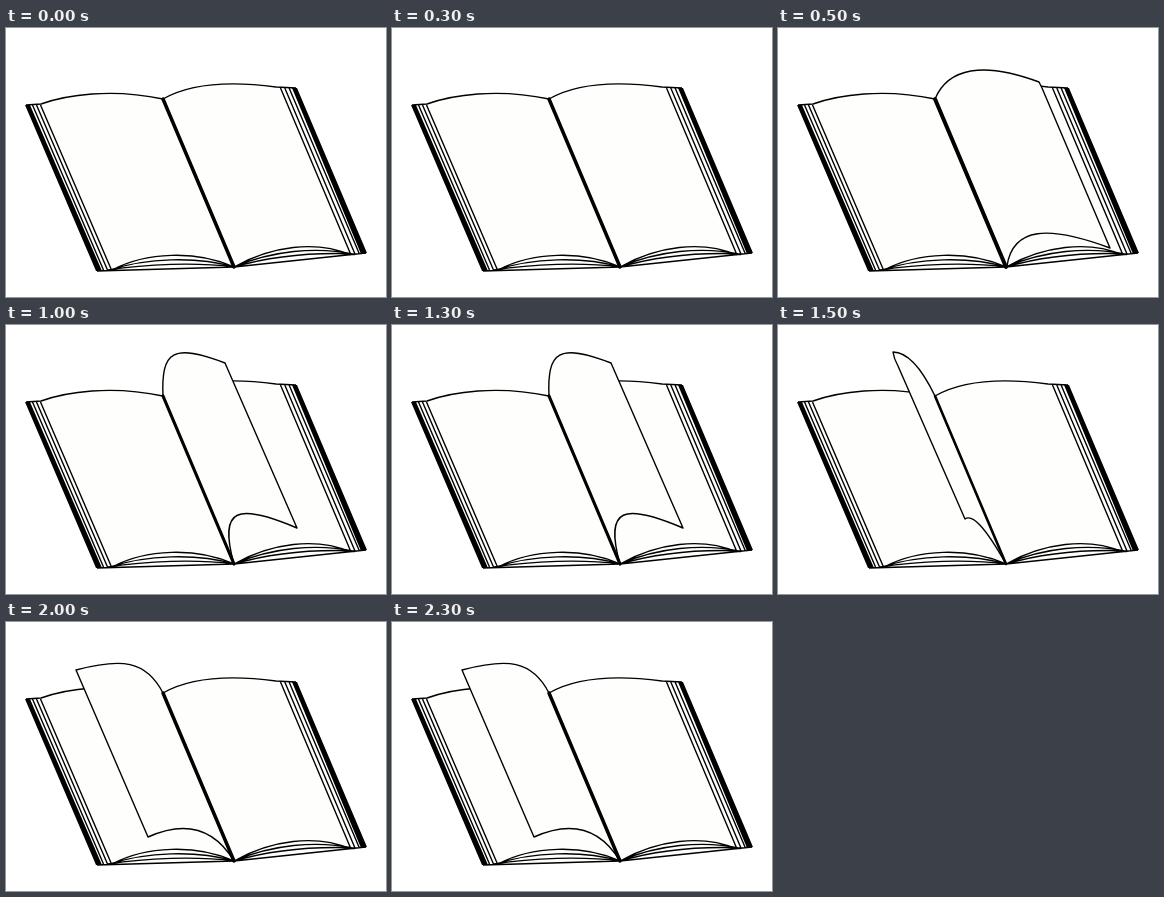
These frames come from a looping animation (380x269 px, 2.5 s). An HTML page with a canvas:

```html
<!DOCTYPE html>
<html lang="en">
<head>
<meta charset="utf-8">
<title>Turning page</title>
<style>
html, body { margin: 0; width: 100%; height: 100%; overflow: hidden; background: #fff; }
canvas { display: block; }
</style>
</head>
<body>
<canvas id="stage" width="380" height="269"></canvas>
<script>
const ctx = document.getElementById('stage').getContext('2d');
const HOLD = 500;
const PAPER = '#fefefc';
const INK = '#000';

// Each pose: outline of the turning page, from spine top to spine bottom.
const poses = [
  { spine: 3.5 },
  { spine: 4, page: 'M157 71C170 40 205 33 261 54L264 60L332 220C270 197 235 199 229 238' },
  { spine: 3.2, page: 'M157 71C155 26 167 18 219 38L291 203C232 178 212 182 228 239' },
  { spine: 2.6, page: 'M157 71C142 40 128 27 115 27Q116 34 120 41L187 194C194 189 206 200 228 239' },
  { spine: 3.5, page: 'M157 71C140 38 115 36 70 48L142 215C180 198 208 206 228 239' }
].map(({ spine, page }) => ({ spine, page: page && new Path2D(page) }));

const paper = new Path2D(
  'M20 77L35 76C60 67 105 60 157 71C185 55 225 53 270 59L290 60L360 225L228 239L92 243Z');
const topEdge = new Path2D(
  'M20 77L35 76C60 67 105 60 157 71C185 55 225 53 270 59L290 60');
const covers = new Path2D(
  'M19 77L24 77L96 243L90 243ZM286 60L291 60L361 225L355 226Z');
const spineLine = new Path2D('M157 71L228 239');

const leaves = new Path2D('M91 243L228 239L360 225');
for (let i = 0; i < 3; i++) {
  const sag = i * 6;
  leaves.moveTo(34.5 - i * 4, 77);
  leaves.lineTo(105.5 - i * 4, 242);
  leaves.moveTo(274.5 + i * 4.3, 60);
  leaves.lineTo(345 + i * 4.2, 227 - i * 0.5);
  leaves.moveTo(106 - i * 2, 242);
  leaves.bezierCurveTo(140, 224 + sag, 190, 222 + sag, 228, 239);
  leaves.moveTo(228, 239);
  leaves.bezierCurveTo(265, 218 + i * 5, 310, 212 + i * 6, 345 + i * 4, 227 - i * 0.5);
}

function stroke(path, width) {
  ctx.lineWidth = width;
  ctx.stroke(path);
}

function fill(path, color) {
  ctx.fillStyle = color;
  ctx.fill(path);
}

function draw(time) {
  const { spine, page } = poses[Math.floor(time / HOLD) % poses.length];
  fill(new Path2D('M0 0H380V269H0Z'), '#fff');
  ctx.strokeStyle = INK;
  ctx.lineJoin = 'round';
  fill(paper, PAPER);
  stroke(topEdge, 1.4);
  stroke(leaves, 1.4);
  fill(covers, INK);
  if (page) {
    fill(page, PAPER);
    stroke(page, 1.4);
  }
  ctx.lineCap = 'round';
  stroke(spineLine, spine);
  ctx.lineCap = 'butt';
}

const start = performance.now();
function tick() {
  draw(performance.now() - start);
  requestAnimationFrame(tick);
}
tick();
</script>
</body>
</html>
```
